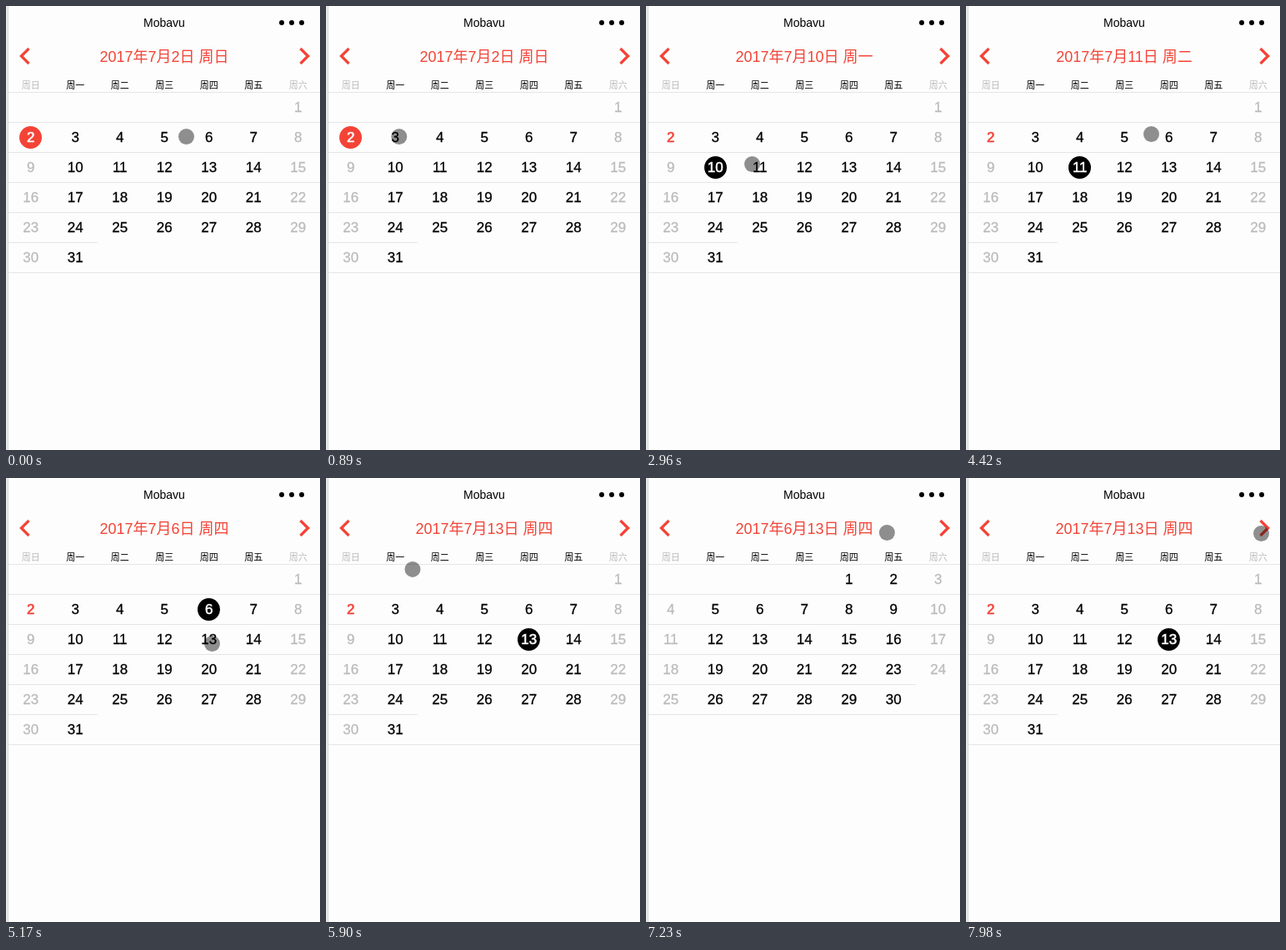
Write an HTML page that moves like this. It is 377 px wide and 532 px high and loops after 8000 ms.

```html
<!DOCTYPE html>
<html lang="zh">
<head>
<meta charset="utf-8">
<title>Calendar</title>
<style>
html, body { margin: 0; width: 100%; height: 100%; overflow: hidden; background: #fdfdfd; }
svg { display: block; }
text {
  font-family: "Liberation Sans", "Noto Sans CJK SC", "Noto Sans CJK", sans-serif;
  text-anchor: middle;
}
.day { font-size: 17px; stroke-width: .3px; }
.marked { stroke-width: .6px; }
.week { font-size: 11px; stroke-width: 0; }
</style>
</head>
<body>
<svg width="377" height="532" viewBox="0 0 377 532">
  <rect width="377" height="532" fill="#fdfdfd"/>
  <rect width="2" height="532" fill="#ebebeb"/>
  <rect x="2" width="1" height="532" fill="#d9d9d9"/>
  <text x="190" y="25" font-size="14">Mobavu</text>
  <g id="dots"></g>
  <g fill="none" stroke="#f44336" stroke-width="3.3">
    <path d="M27.5 51L18.4 60L27.5 69"/>
    <path d="M353.5 51L362.6 60L353.5 69"/>
  </g>
  <text id="heading" x="190" y="67" font-size="18" fill="#f44336"></text>
  <g id="weekdays"></g>
  <g id="grid"></g>
  <circle id="pointer" r="9.5" fill="#000" fill-opacity=".44"/>
</svg>
<script>
const LOOP = 8000, STEP = 147.3;  // the picture is held for one step at a time
const WIDTH = 377, LEFT = 3, TOP = 103, CELL = 53.5, ROW = 36;
const RED = '#f44336', GREY = '#bbb', LINE = '#e5e5e5';
const NAMES = '日一二三四五六';
const JUNE = { number: 6, first: 4, days: 30 };
const JULY = { number: 7, first: 6, days: 31, today: 2 };

const PICKS = [
  { step: 0, month: JULY, day: 2 },
  { step: 17, month: JULY, day: 10 },
  { step: 25, month: JULY, day: 11 },
  { step: 33, month: JULY, day: 6 },
  { step: 37, month: JULY, day: 13 },
  { step: 44, month: JUNE, day: 13 },
  { step: 53, month: JULY, day: 13 }
];

const HOME = [216.5, 156.5];
const GLIDES = [
  { from: 0, to: 2, at: [132.5, 156.5] },
  { from: 3, to: 7, at: [79.5, 156.5] },
  { from: 9, to: 14, at: [82, 195.5] },
  { from: 17, to: 20, at: [127.5, 189.5] },
  { from: 20, to: 22, at: [137, 211] },
  { from: 22, to: 24, at: [137, 197.5] },
  { from: 26, to: 30, at: [222.5, 153.5] },
  { from: 30, to: 32, at: [247.5, 158] },
  { from: 33, to: 35, at: [247.5, 198.5] },
  { from: 37, to: 42, at: [26, 61] },
  { from: 44, to: 51, at: [354.5, 66.5] }
];

const $ = id => document.getElementById(id);
const ease = p => p * p * (3 - 2 * p);
const colX = col => LEFT + CELL * (col + .5);
const inkFor = col => col % 6 ? '#000' : GREY;
const label = (x, y, cls, ink, str) =>
  `<text class="${cls}" x="${x}" y="${y}" fill="${ink}" stroke="${ink}">${str}</text>`;
const rule = (row, end) =>
  `<rect x="${LEFT}" y="${TOP + row * ROW}" width="${end - LEFT}" height="1" fill="${LINE}"/>`;

function drawDay(day, month, selected) {
  const cell = month.first + day - 1, col = cell % 7;
  const x = colX(col), y = TOP + ROW * Math.floor(cell / 7);
  const isToday = day === month.today;
  if (day !== selected) {
    return label(x, y + 24, isToday ? 'day marked' : 'day', isToday ? RED : inkFor(col), day);
  }
  const disc = `<circle cx="${Math.floor(x) + .5}" cy="${y + 18.5}" r="13.5" fill="${isToday ? RED : '#000'}"/>`;
  return disc + label(x, y + 24, 'day marked', '#fff', day);
}

function drawGrid(month, selected) {
  const cells = month.first + month.days, rows = Math.ceil(cells / 7);
  let out = '';
  for (let r = 0; r <= rows; r++) {
    // the rule above the last week ends with its last day
    out += rule(r, r === rows - 1 ? colX((cells - 1) % 7) + CELL / 2 : WIDTH);
  }
  for (let d = 1; d <= month.days; d++) out += drawDay(d, month, selected);
  return out;
}

function pointerAt(step) {
  let [x, y] = HOME;
  for (const { from, to, at } of GLIDES) {
    if (step <= from) break;
    const p = ease(Math.min(1, (step - from) / (to - from)));
    x += (at[0] - x) * p;
    y += (at[1] - y) * p;
  }
  return [x, y];
}

let shown;
function showPick(pick) {
  if (pick === shown) return;
  shown = pick;
  const { month, day } = pick;
  // the weekday stays that of the July date when the month is switched
  const weekday = NAMES[(JULY.first + day - 1) % 7];
  $('heading').textContent = `2017年${month.number}月${day}日 周${weekday}`;
  $('grid').innerHTML = drawGrid(month, month === JULY ? day : 0);
}

function render(t) {
  const step = Math.floor(t / STEP);
  showPick(PICKS.findLast(pick => pick.step <= step));
  const [x, y] = pointerAt(step);
  $('pointer').setAttribute('cx', x);
  $('pointer').setAttribute('cy', y);
}

$('dots').innerHTML = [0, 1, 2]
  .map(i => `<circle cx="${331 + 12 * i}" cy="20" r="3"/>`).join('');
$('weekdays').innerHTML = [...NAMES]
  .map((name, col) => label(colX(col), 99, 'week', inkFor(col), '周' + name)).join('');

const start = performance.now();
function tick() {
  render((performance.now() - start) % LOOP);
  requestAnimationFrame(tick);
}
tick();
</script>
</body>
</html>
```
